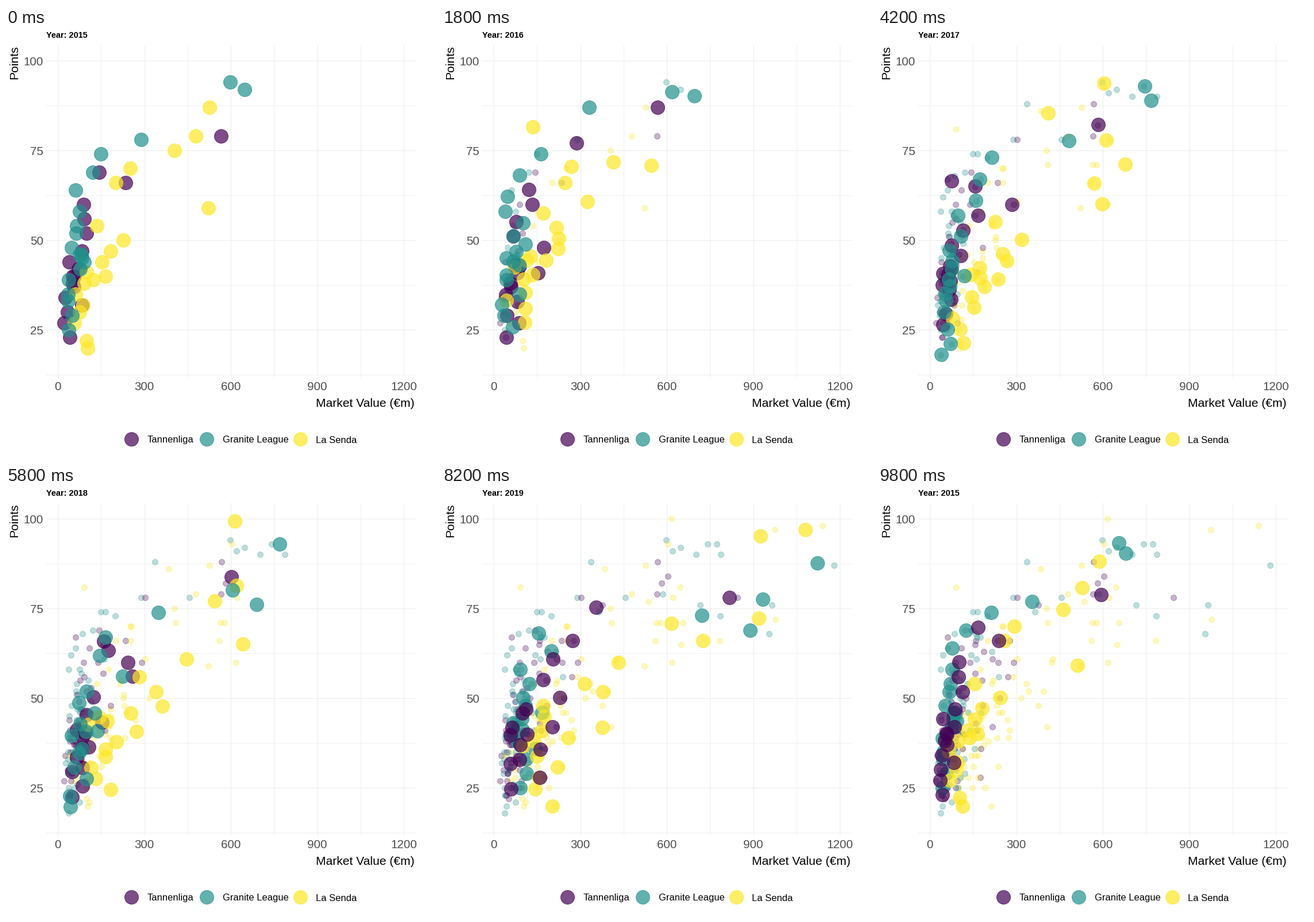
A matplotlib script for the animation above (10 s loop, 748 by 748 pixels).

```python
import numpy as np
import matplotlib.pyplot as plt
from matplotlib.animation import FuncAnimation

SIZE, DPI = 748, 100
PX = 72 / DPI
STEPS, YEARS = 10, range(2015, 2020)
NAMES = ["Tannenliga", "Granite League", "La Senda"]
COLORS = ["#440154", "#21908C", "#FDE725"]

plt.rcParams["font.family"] = "Liberation Sans"

# Leading clubs: market value and points for each year
LEADERS = [
    [[(566, 79), (567, 88), (582, 82), (603, 84), (845, 78)],
     [(144, 69), (302, 78), (62, 67), (187, 63), (377, 76)]],
    [[(598, 94), (619, 91), (742, 93), (773, 93), (1180, 87)],
     [(648, 92), (701, 90), (788, 90), (585, 79), (965, 76)],
     [(288, 78), (336, 88), (457, 78), (716, 76), (955, 68)]],
    [[(526, 87), (91, 81), (603, 93), (616, 100), (1141, 98)],
     [(478, 79), (408, 71), (385, 86), (645, 81), (974, 97)],
     [(404, 75), (254, 70), (621, 78), (535, 77), (977, 72)]],
]

# Other clubs: count, best and worst points, median value, yearly growth, top boost
FIELD = [
    (16, 65, 25, 58, 1.14, 1.3),
    (17, 74, 22, 52, 1.2, 1.2),
    (17, 71, 24, 112, 1.16, 2.8),
]


def make_field(count, best, worst, mid, growth, boost, rng):
    u = np.linspace(1, 0, count)
    v = 2 * u - 1
    shape = 0.4 + np.where(v > 0, 0.6, -0.4) * np.abs(v) ** 1.6
    years = []
    for k in range(len(YEARS)):
        lo = worst + rng.uniform(-5, 5)
        y = np.round(lo + (best - lo) * shape + rng.uniform(-1, 1, count))
        spread = np.exp(0.35 * rng.standard_normal(count))
        x = mid * growth ** k * spread * (0.75 + 0.4 * u + boost * u ** 5)
        years.append(np.column_stack([np.maximum(x, 20), y]))
    return np.array(years)


def to_px(data):
    x, y = data[..., 0], data[..., 1]
    return np.stack([90.2 + 0.5015 * x, 57 + 6.245 * (100 - y)], axis=-1)


rng = np.random.default_rng(8)
tracks = []
for lead, spec in zip(LEADERS, FIELD):
    top = np.array(lead, float).transpose(1, 0, 2)
    tracks.append(to_px(np.concatenate([top, make_field(*spec, rng)], axis=1)))

fig = plt.figure(figsize=(SIZE / DPI, SIZE / DPI), dpi=DPI, facecolor="white")
ax = fig.add_axes([0, 0, 1, 1])
ax.set_xlim(0, SIZE)
ax.set_ylim(SIZE, 0)
ax.axis("off")


def label(x, y, text, size, color="black", **kw):
    return ax.text(x, y, text, fontsize=size * PX, color=color, **kw)


def dots(points, color, diameter, alpha, z):
    return ax.scatter(points[:, 0], points[:, 1], s=(diameter * PX) ** 2,
                      color=color, alpha=alpha, linewidths=0.7, zorder=z)


def grid_line(xs, ys, major):
    ax.plot(xs, ys, color="#ebebeb" if major else "#efefef", lw=PX, zorder=0)


# Grid and tick labels
GREY = "#4d4d4d"
for i in range(9):
    x = to_px(np.array([150 * i, 0]))[0]
    major = i % 2 == 0
    grid_line([x, x], [30, 608], major)
    if major:
        label(x, 630, str(150 * i), 20.5, GREY, ha="center")
for i in range(1, 9):
    y = to_px(np.array([0, 12.5 * i]))[1]
    major = i % 2 == 0
    grid_line([70, 711], [y, y], major)
    if major:
        label(65, y + 8, str(25 * i // 2), 20.5, GREY, ha="right")

label(711, 659, "Market Value (€m)", 21, ha="right")
label(23, 30, "Points", 21, rotation=90, ha="right", va="top")
title = label(70, 17, "", 14.5, weight="bold")

# Legend
for x, tx, name, color in zip([218, 349, 512], [246, 377, 539], NAMES, COLORS):
    dots(np.array([[x, 715]]), color, 24, 0.7, 3)
    label(tx, 721.5, name, 16.5)

trails = [[dots(t[s], c, 10, 0.3, 1) for t, c in zip(tracks, COLORS)]
          for s in range(len(YEARS))]
live = [dots(t[0], c, 24, 0.7, 3) for t, c in zip(tracks, COLORS)]


def update(frame):
    state, step = divmod(frame, STEPS)
    p = step / STEPS
    nxt = (state + 1) % len(YEARS)
    order = [5, 3, 4] if state == 4 else [3, 5, 4]
    for points, track, z in zip(live, tracks, order):
        points.set_offsets(track[state] * (1 - p) + track[nxt] * p)
        points.set_zorder(z)
    for s, group in enumerate(trails):
        for trail in group:
            trail.set_visible(frame > s * STEPS)
    title.set_text(f"Year: {YEARS[state if p < 0.5 else nxt]}")
    return live


anim = FuncAnimation(fig, update, frames=STEPS * len(YEARS), interval=200,
                     repeat=True, repeat_delay=0, blit=False)
# Fix the label's vertical anchor to the panel top
for text in ax.texts:
    if text.get_rotation() == 90:
        text.set_x(5)
        text.set_ha("left")
plt.show()
```
